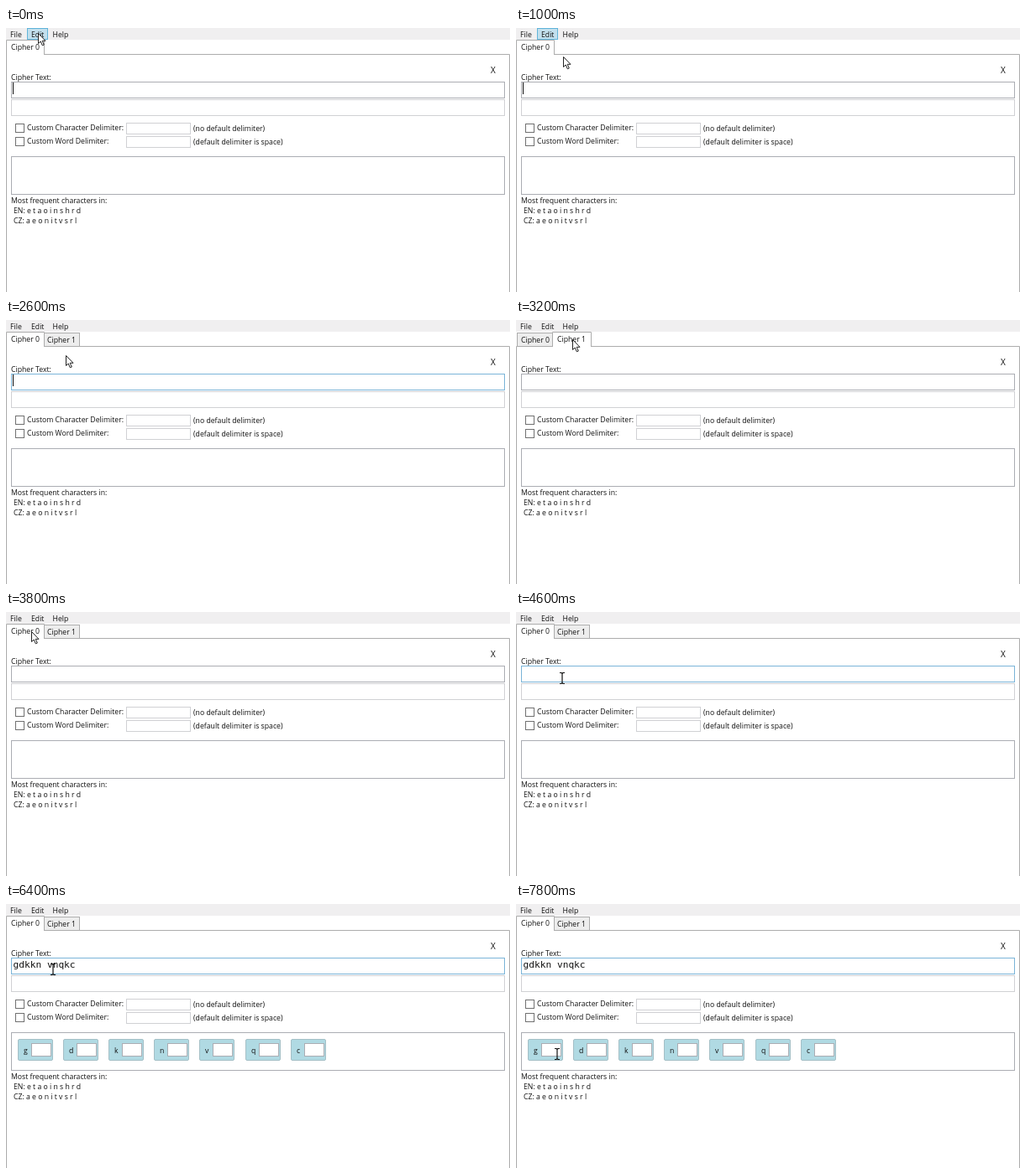
An HTML page that plays this animation: 600 by 315 pixels, repeating every 8000 ms.

```html
<!DOCTYPE html>
<html lang="en">
<head>
<meta charset="utf-8">
<title>Cipher tool</title>
<style>
  html, body { margin: 0; width: 100%; height: 100%; overflow: hidden; background: #fff; }
  svg { display: block; width: 600px; height: 315px; }
  text { font: 8.7px "Open Sans", "Noto Sans", sans-serif; fill: #111; white-space: pre; }
  .mono { font: 11.2px "DejaVu Sans Mono", monospace; }
  .close { font-size: 10px; }
</style>
</head>
<body>
<svg id="stage" viewBox="0 0 600 315"></svg>
<script>
const LOOP = 8000, STEP = 200;
const ADD_TAB = 2200, OPEN_TAB = 3000, RETURN_TAB = 3600, FOCUS = 4200, PASTE = 4800;
const GRAY = "#abadb3", PALE = "#d0d1d4", BLUE = "#7ab4d8";
const CIPHER = "gdkkn vnqkc";

// time, x, y of the pointer
const PATH = [
  [0, 38, 6], [400, 38, 6], [1600, 74, 61], [2200, 74, 61],
  [3000, 67, 23], [3200, 67, 23], [3600, 28, 21], [3800, 30, 23],
  [4400, 55, 79], [6200, 55, 79], [6400, 56, 78], [7400, 49, 179], [LOOP, 49, 179]
];

const stage = document.getElementById("stage");

// Boxes are given by their outer pixel edges, with a one pixel border inside.
const box = (x, y, w, h, stroke, fill = "#fff", rx = 0) =>
  `<rect x="${x + .5}" y="${y + .5}" width="${w - 1}" height="${h - 1}" rx="${rx}" fill="${fill}" stroke="${stroke}"/>`;
const label = (x, y, s, cls = "") => `<text x="${x}" y="${y}" class="${cls}">${s}</text>`;

function pointerAt(t) {
  const i = PATH.findIndex((p, n) => n > 0 && t <= p[0]);
  const [t0, x0, y0] = PATH[i - 1], [t1, x1, y1] = PATH[i];
  const u = (t - t0) / (t1 - t0), k = u * u * (3 - 2 * u);
  return [Math.round(x0 + (x1 - x0) * k), Math.round(y0 + (y1 - y0) * k)];
}

function pointer(t) {
  const [x, y] = pointerAt(t);
  const overText = (y >= 64 && y <= 105) || (t > PASTE && y >= 167 && y <= 181);
  const shape = overText
    ? `<path d="M-3 -6.5H-1L0 -5.5L1 -6.5H3M0 -5.5V5.5M-3 6.5H-1L0 5.5L1 6.5H3" fill="none" stroke="#111" stroke-width="1.2"/>`
    : `<path d="M.5 .5V12.5L3.2 10L5.3 14.8L7.3 14L5.2 9.3H9Z" fill="#fff" stroke="#222" stroke-width="1"/>`;
  return `<g transform="translate(${x} ${y})">${shape}</g>`;
}

function menu(open) {
  return `<rect width="600" height="14" fill="#f0eff0"/>`
    + (open ? box(25, 0, 25, 14, "#61b4da", "#c3e0ed") : "")
    + label(5, 11, "File") + label(30, 11, "Edit") + label(55.5, 11, "Help");
}

function tabs(t) {
  const second = t >= OPEN_TAB && t < RETURN_TAB;
  const idle = (x, w) => box(x, 15, w, 17, "#acacac", "#ededed");
  const active = (x, w) =>
    `<path d="M${x + .5} 32V14.5H${x + w - .5}V32" fill="#fff" stroke="#acacac"/>`;
  const hasSecond = t >= ADD_TAB;
  return (second ? idle(1, 43) : hasSecond ? idle(45, 43) : "")
    + `<path d="M.5 315V31.5H599.5V315" fill="#fff" stroke="#acacac"/>`
    + (second ? active(43, 47) : active(0, 46))
    + label(6, second ? 27 : 26, "Cipher 0")
    + (hasSecond ? label(49, second ? 26 : 27, "Cipher 1") : "");
}

function option(y, name, note) {
  return box(11, y + 1, 11, 11, "#707070") + label(25, y + 9, name)
    + box(143, y, 77, 14, PALE) + label(223, y + 10, note);
}

function tiles() {
  return [...new Set(CIPHER.replace(" ", ""))].map((c, i) => {
    const x = Math.round(14 + i * 54.1);
    return box(x, 161, 42, 26, "#a4bfc6", "#b0dae3", 1.5)
      + label(x + 7, 178, c) + box(x + 16, 166, 24, 16, GRAY);
  }).join("");
}

function form(t) {
  const focused = (t >= ADD_TAB && t < OPEN_TAB) || t >= FOCUS;
  const pasted = t >= PASTE;
  return label(577, 54, "X", "close") + label(6, 62, "Cipher Text:")
    + box(6, 64, 588, 20, focused ? BLUE : GRAY) + box(6, 85, 588, 20, PALE)
    + (t < OPEN_TAB ? `<rect x="8" y="65" width="1" height="14" fill="#111"/>` : "")
    + option(113, "Custom Character Delimiter:", "(no default delimiter)")
    + option(129, "Custom Word Delimiter:", "(default delimiter is space)")
    + box(6, 153, 588, 46, GRAY)
    + (pasted ? label(8.5, 76, CIPHER, "mono") + tiles() : "")
    + label(6, 209, "Most frequent characters in:")
    + label(9, 221, "EN: e t a o i n s h r d")
    + label(9, 233, "CZ: a e o n i t v s r l");
}

let shown = -1;
function frame() {
  const t = Math.floor(performance.now() % LOOP / STEP) * STEP;
  if (t !== shown) {
    shown = t;
    stage.innerHTML = menu(t < ADD_TAB) + tabs(t) + form(t) + pointer(t);
  }
  requestAnimationFrame(frame);
}
frame();
</script>
</body>
</html>
```
